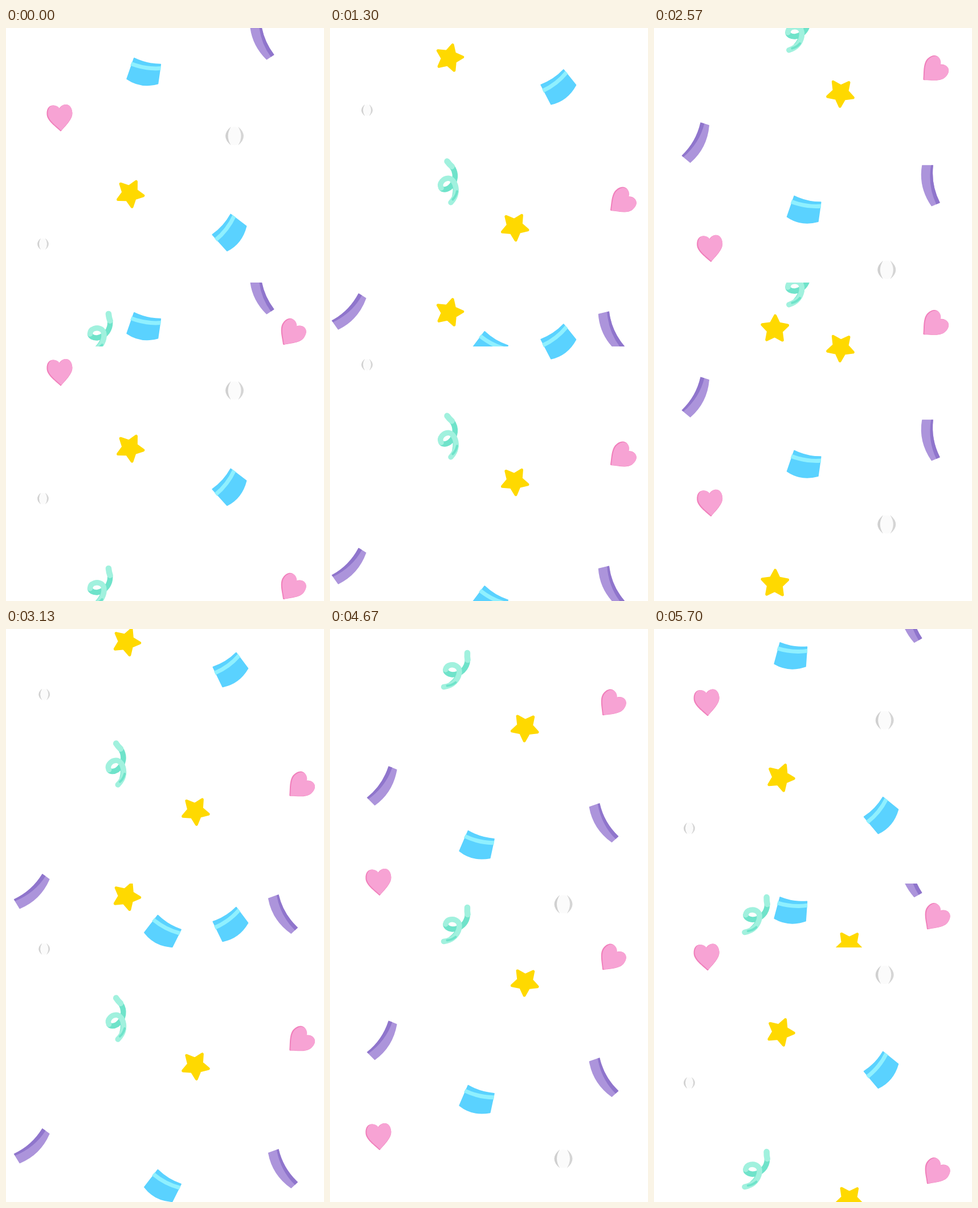
An HTML page that plays this animation: 558 px wide and 1004 px high, repeating every 5730 ms.

```html
<!DOCTYPE html>
<html lang="en">
<head>
<meta charset="utf-8">
<title>Falling confetti</title>
<style>
  html, body { margin: 0; width: 100%; height: 100%; overflow: hidden; background: #fff; }
  body > svg { display: block; width: 100vw; height: 100vh; }
  .curl { fill: none; stroke-linecap: round; stroke-linejoin: round; stroke-width: 9.5; }
</style>
</head>
<body>
<svg viewBox="0 0 558 1004">
  <defs>
    <path id="heartShape" d="M0-16C-6-26-22-26-22.5-8C-23 4-8 15-1.5 22.5Q0 24.5 1.5 22.5C8 15 23 4 22.5-8C22-26 6-26 0-16Z"/>
    <g id="heart">
      <use href="#heartShape" fill="#f07fbb"/>
      <use href="#heartShape" fill="#f7a3d4" transform="translate(1 -.8) scale(.95 .965)"/>
    </g>
    <path id="star" fill="#ffd900" stroke="#ffd900" stroke-width="5" stroke-linejoin="round"/>
    <g id="card">
      <path fill="#5ad2ff" stroke="#5ad2ff" stroke-width="2" stroke-linejoin="round" d="M-22-18.5Q2-13 25.5-18.5L28.5 15.5Q1 30-26 19.5Z"/>
      <path fill="#8ff0ff" d="M-24.6-11.5Q2-7.5 27-15.5L28-8.5Q2-.5-25.6-4.5Z"/>
    </g>
    <g id="strip">
      <path fill="#ac94db" stroke="#ac94db" stroke-width="1.5" stroke-linejoin="round" d="M-9-36Q-22.5 0-6.5 36.5L8 33.5Q-1.4 0 9-32.5Z"/>
      <path fill="#8f75cc" d="M9.7-33Q-1 0 8.7 34L2 35.5Q-7 2 6-33.5Z"/>
    </g>
    <g id="curl" class="curl">
      <path stroke="#6fe3ca" d="M21-17C20-2 9 9-6 9C-14 8-18 4-17.5 0M6 6Q4 17-8 26"/>
      <path stroke="#a1f1de" stroke-width="10.5" d="M20.5-29Q20-22 21-17"/>
      <path stroke="#a1f1de" d="M-17.5 0C-16-9-3-11 4-4C9 2 6 14-2 22Q-9 29-21 30.5"/>
      <path stroke="#6fe3ca" stroke-width="4" d="M0 22.5Q-7 28-15 28.5"/>
    </g>
    <path id="crescent" d="M-6-16.5Q-26 0-6 16.5Q-17 0-6-16.5Z"/>
    <g id="coin">
      <ellipse rx="15" ry="16" fill="#fbfbfb"/>
      <use href="#crescent" fill="#d0d0d0"/>
      <use href="#crescent" fill="#d5d5d5" transform="scale(-1 1)"/>
    </g>
  </defs>
  <svg width="558" height="558"><g id="tile"></g></svg>
  <svg y="446" width="558" height="558"><use href="#tile"/></svg>
</svg>
<script>
const STEPS = 24, LOOP = 5730, SWAY_STEPS = 12, MARGIN = 70;
const tile = document.getElementById('tile');
const wave = t => Math.cos(2 * Math.PI * t / SWAY_STEPS);

document.getElementById('star').setAttribute('d', 'M' + Array.from({length: 10}, (_, i) => {
  const r = i % 2 ? 12 : 23.5, a = i * Math.PI / 5;
  return [r * Math.sin(a), -r * Math.cos(a)].map(n => n.toFixed(2));
}).join('L') + 'Z');

// Each piece falls, drifts and spins steadily; it sways sideways (furthest right
// at step `peak`) and swings `lag` steps behind its sway.
const base = {fall: 29.3, drift: 0, sway: 0, peak: 0, turn: 0, spin: 0, swing: 0, lag: 3, size: 1};
const pieces = [
  {shape: 'curl', x: 240.5, y: -259, fall: 33, drift: -2, sway: 32, peak: 7, turn: -20, swing: 20},
  {shape: 'heart', x: 105.8, y: 157.5, fall: 28.6, drift: -.76, sway: 14, peak: 4.8, turn: -4},
  {shape: 'heart', x: 508.3, y: -155.5, fall: 28.8, drift: -.5, sway: 14.7, peak: 2.5, turn: 45, swing: 10},
  {shape: 'star', x: 213, y: 290, fall: 29.7, drift: -.7, sway: 9.3, peak: -2, turn: 14.5, swing: 15},
  {shape: 'star', x: 338.3, y: -120.5, drift: -.4, sway: 15.5, turn: 35, swing: -4},
  {shape: 'strip', x: 459.5, y: 18.5, fall: 32, drift: 2.2, sway: 11, peak: -5, turn: -5.5, spin: -1.7, swing: 16, lag: -1},
  {shape: 'strip', x: 90.6, y: -96.5, fall: 37, drift: -2.2, sway: 26, peak: 11, turn: 218.7, swing: 10},
  {shape: 'card', x: 250.5, y: 76, fall: 30.2, drift: 1.45, sway: 9, peak: 5.3, turn: 11, spin: 1, swing: -6},
  {shape: 'card', x: 402, y: 358, fall: 31.9, sway: 15, peak: -4.6, turn: -48, spin: -1.8},
  {shape: 'coin', x: 400.2, y: 189.3, drift: .2, sway: 8, peak: -2.8},
  {shape: 'coin', x: 62, y: 378.5, sway: 6, peak: 2, size: .62}
].map(piece => {
  const el = document.createElementNS('http://www.w3.org/2000/svg', 'use');
  el.setAttribute('href', '#' + piece.shape);
  tile.append(el);
  return {...base, ...piece, el};
});

function place(p, step) {
  const age = step - STEPS * Math.floor((p.y + p.fall * step + MARGIN) / (STEPS * p.fall));
  const x = p.x + p.drift * age + p.sway * wave(age - p.peak);
  const y = p.y + p.fall * age;
  const turn = p.turn + p.spin * age + p.swing * wave(age - p.peak - p.lag);
  p.el.setAttribute('transform', `translate(${x} ${y}) rotate(${turn}) scale(${p.size})`);
}

function draw(now) {
  // 80 ms poses shown on a 30 Hz clock
  const tick = Math.floor(now % LOOP * .03 + .11);
  const step = Math.floor(tick / 2.4 + 1e-6) % STEPS;
  pieces.forEach(p => place(p, step));
  requestAnimationFrame(draw);
}
draw(0);
</script>
</body>
</html>
```
